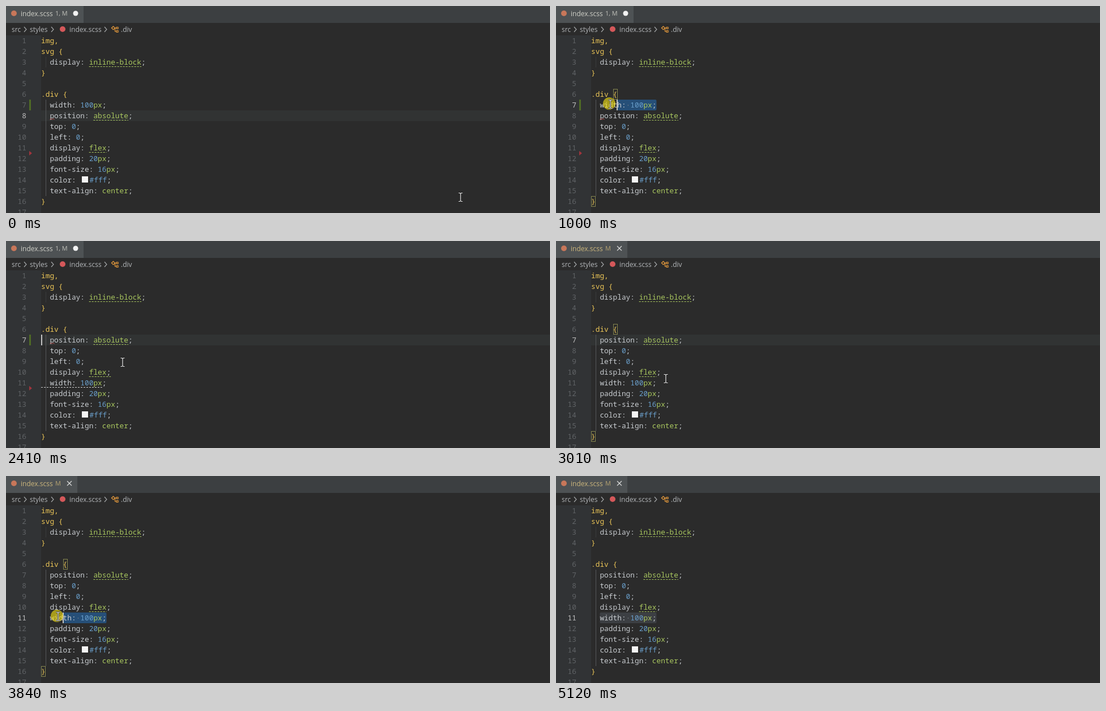
Recreate the animation shown at these times as an HTML page. Size 961x367 px, loop 5.2 s.

```html
<!DOCTYPE html>
<html lang="en">
<head>
<meta charset="utf-8">
<title>Moving a declaration</title>
<style>
  html, body { margin: 0; width: 100%; height: 100%; overflow: hidden; background: #2b2b2b; }
  svg { display: block; }
  text { white-space: pre; }
  .mono { font: 12.83px "Noto Sans Mono", "DejaVu Sans Mono", monospace; }
  .ui { font: 12px "Open Sans", "Noto Sans", sans-serif; fill: #b4b7ba; }
</style>
</head>
<body>
<svg id="stage" width="961" height="367" viewBox="0 0 961 367"></svg>
<script>
const LOOP = 5200, LEFT = 62, CHAR = 7.7, ROW = 19, TOP = 52;
const YELLOW = '#ecc658', GREY = '#c8ccd0', GREEN = '#a9c75f', BLUE = '#6a9fcb';
const stage = document.getElementById('stage');

function add(parent, tag, attrs = {}, content) {
  const el = document.createElementNS('http://www.w3.org/2000/svg', tag);
  for (const name in attrs) el.setAttribute(name, attrs[name]);
  if (content !== undefined) el.textContent = content;
  parent.appendChild(el);
  return el;
}
const rect = (parent, x, y, width, height, fill, more) =>
  add(parent, 'rect', { x, y, width, height, fill, ...more });
const path = (parent, d, stroke, width = 1, more) =>
  add(parent, 'path', { d, stroke, 'stroke-width': width, fill: 'none', ...more });
const label = (parent, x, y, content, more) =>
  add(parent, 'text', { class: 'ui', x, y, ...more }, content);
const show = (el, on) => el.setAttribute('display', on ? 'inline' : 'none');
const colX = col => LEFT + col * CHAR;
const rowY = line => TOP + (line - 1) * ROW;

// Editor backdrop
rect(stage, 0, 0, 961, 367, '#2b2b2b');
rect(stage, 0, TOP, LEFT, 315, '#313335');
const activeRow = rect(stage, LEFT, 0, 899, ROW, '#313333');
const selection = rect(stage, 0, 0, 0, ROW, '#264f78', { rx: 2 });

// Tab bar
rect(stage, 0, 0, 961, 30, '#3c3f41');
const tab = rect(stage, 0, 0, 137, 30, '#4e5254');
add(stage, 'circle', { cx: 14, cy: 13, r: 5, fill: '#c8775a' });
const title = label(stage, 26, 18, 'index.scss');
const badge = label(stage, 87, 17, '1, M', { style: 'font-size:11px' });
const dirtyDot = add(stage, 'circle', { cx: 123, cy: 13, r: 4.5, fill: '#f2f2f2' });
const closeMark = path(stage, 'M-4 -4L4 4M4 -4L-4 4', '#d8d8d8', 1.3);

// Breadcrumbs
label(stage, 10, 46, 'src');
label(stage, 42, 46, 'styles');
label(stage, 112, 46, 'index.scss');
label(stage, 203, 46, '.div');
for (const x of [32, 80, 174]) path(stage, `M${x} 37l4 4.5-4 4.5`, '#a4a7a9', 1.2);
add(stage, 'circle', { cx: 100, cy: 41, r: 5, fill: '#d4585a' });
path(stage, 'M186.500 39l3-3 3 3-3 3zM192 39h3M192.500 39v6h2M195 37.500h3v3h-3zM195 43.500h3v3h-3z', '#e69a3c', 1.2);

// Gutter
const numbers = [];
for (let line = 1; line <= 17; line++) {
  numbers[line] = add(stage, 'text',
    { class: 'mono', x: 36, y: rowY(line) + 14, 'text-anchor': 'end', fill: '#606366' }, line);
}
const gutterMarks = add(stage, 'g');
rect(gutterMarks, 41, rowY(7), 3, ROW, '#4f6b25');
add(gutterMarks, 'path', { d: 'M41 257l5 4-5 4z', fill: '#a0353d' });

path(stage, `M70.500 ${rowY(3)}v${ROW}`, '#393b3c');
path(stage, `M70.500 ${rowY(7)}V${rowY(16)}`, '#555759');

// Code
function dashes(parent, line, from, to, color) {
  return path(parent, `M${colX(from)} ${rowY(line) + 17.5}H${colX(to)}`, color, 1,
    { 'stroke-dasharray': '3 2' });
}
function tokenColor(token, inValue) {
  if (!inValue || /^[:;\s]/.test(token)) return GREY;
  return /^[\d#]/.test(token) ? BLUE : GREEN;
}
function drawRow(parent, source, line) {
  const text = add(parent, 'text', { class: 'mono', x: LEFT, y: rowY(line) + 14, fill: YELLOW });
  if (!source.startsWith('  ')) { text.textContent = source; return; }
  const colon = source.indexOf(':');
  for (const match of source.matchAll(/#\w+|\d+|[a-z-]+|[:;]|\s+/g)) {
    const [token] = match, col = match.index;
    const span = add(text, 'tspan', { fill: tokenColor(token, col > colon) }, token);
    if (token[0] === '#') {
      span.setAttribute('x', 147.5);
      rect(parent, 134, rowY(line) + 3, 11, 11, '#f4f4f4');
    }
    if (/^(inline-block|absolute|flex)$/.test(token)) dashes(parent, line, col, col + token.length, GREEN);
  }
}
function drawCode(declarations) {
  const group = add(stage, 'g');
  const rows = ['img,', 'svg {', '  display: inline-block;', '}', '', '.div {',
    ...declarations.map(d => `  ${d};`), '}'];
  rows.forEach((source, i) => drawRow(group, source, i + 1));
  return group;
}
const head = ['position: absolute', 'top: 0', 'left: 0', 'display: flex'];
const tail = ['padding: 20px', 'font-size: 16px', 'color: #fff', 'text-align: center'];
const codeBefore = drawCode(['width: 100px', ...head, ...tail]);
const codeAfter = drawCode([...head, 'width: 100px', ...tail]);

const staleHints = add(stage, 'g');
dashes(staleHints, 10, 15, 16, GREEN);
dashes(staleHints, 11, 0, 14, '#cfcfcf');
const spaceDot = add(stage, 'circle', { cx: colX(8.5), r: 0.8, fill: '#7b8288' });
const squiggle = path(stage, 'M77.500 1.500l2-2 2 2 2-2 2 2', '#c75450', 1);

const brackets = add(stage, 'g');
for (const [col, line] of [[5, 6], [0, 16]]) {
  rect(brackets, Math.round(colX(col)) + 0.5, rowY(line) + 0.5, 7, ROW - 1, 'none', { stroke: '#85864f' });
}
const caret = rect(stage, 0, 0, 2, ROW, '#c4c4c4');

// Pointer
const pressRing = add(stage, 'circle', { r: 11, fill: '#f5e214', opacity: 0.62 });
const pointer = add(stage, 'g');
const beam = 'M-3.500 -7.500H-1.500L0 -6.500L1.500 -7.500H3.500M0 -6.500V6.500M-3.500 7.500H-1.500L0 6.500L1.500 7.500H3.500';
path(pointer, beam, '#1c1c1c', 2.6);
path(pointer, beam, '#f0f0f0', 1.2);

// Bursts of activity: start, end, number of picture changes
const bursts = [[70, 540, 8], [730, 1200, 8], [1270, 1340, 2], [1540, 1800, 5], [2200, 2680, 8],
  [2740, 3010, 5], [3360, 3840, 7], [3910, 3980, 2], [4370, 4860, 8], [4920, 5120, 3]];

const pointerPath = [[0, 803, 339], [20, 803, 339], [540, 197, 183], [663, 197, 183], [800, 182, 174],
  [998, 96, 174], [1200, 81, 173], [1340, 75, 173], [1475, 75, 173], [1800, 291, 169],
  [2135, 291, 169], [2410, 206, 215], [2680, 197, 243], [3010, 194, 244], [3295, 194, 244],
  [3480, 188, 264], [3580, 182, 252], [3840, 92, 249], [3910, 75, 249], [3980, 79, 242],
  [4300, 79, 242], [4860, 938, 359]];
const firstDrag = [[800, 15], [998, 6], [1200, 2]];
const secondDrag = [[3580, 15], [3840, 5], [3910, 2]];

function snap(t) {
  let snapped = 0;
  for (const [start, end, count] of bursts) {
    if (t < start) break;
    const step = (end - start) / (count - 1);
    snapped = start + Math.min(count - 1, Math.floor((t - start) / step)) * step;
  }
  return snapped;
}
function track(keys, t) {
  const i = keys.findIndex(key => key[0] > t);
  if (i === 0) return keys[0].slice(1);
  if (i < 0) return keys[keys.length - 1].slice(1);
  const a = keys[i - 1], b = keys[i];
  const u = (t - a[0]) / (b[0] - a[0]), eased = u * u * (3 - 2 * u);
  return a.slice(1).map((v, k) => v + (b[k + 1] - v) * eased);
}

function draw(time) {
  const t = snap(time);
  const between = (a, b) => t >= a && t < b;
  const moved = t >= 2260, saved = t >= 2535, clean = t >= 2735;
  const secondPick = t >= 3570;
  const line = t < 790 ? 8 : secondPick ? 11 : 7;

  show(codeBefore, !moved);
  show(codeAfter, moved);
  show(staleHints, between(2260, 2600));
  show(gutterMarks, !saved);
  show(squiggle, !clean);
  squiggle.setAttribute('transform', `translate(0 ${rowY(moved ? 7 : 8) + 15})`);
  numbers.forEach((el, n) => {
    el.setAttribute('fill', n === line ? '#c0c0c0' : '#606366');
    el.setAttribute('font-weight', n === line ? 600 : 400);
  });

  tab.setAttribute('width', clean ? 126 : 137);
  title.style.fill = clean ? '#ccb67c' : '#d0d0c8';
  badge.style.fill = clean ? '#b5a270' : '#c0c1ba';
  badge.textContent = clean ? 'M' : '1, M';
  show(dirtyDot, !saved);
  show(closeMark, saved);
  closeMark.setAttribute('transform', `translate(${clean ? 112 : 123} 13)`);

  show(activeRow, t < 790 || between(2260, 3570));
  activeRow.setAttribute('y', rowY(line));

  const selecting = between(790, 2260) || secondPick;
  const col = Math.round(track(secondPick ? secondDrag : firstDrag, t)[0]);
  show(selection, selecting);
  selection.setAttribute('x', colX(col));
  selection.setAttribute('y', rowY(line));
  selection.setAttribute('width', (15 - col) * CHAR);
  selection.setAttribute('fill', t >= 4915 ? '#3c3f43' : '#264f78');
  show(spaceDot, selecting && col <= 8);
  spaceDot.setAttribute('cy', rowY(line) + 10);

  show(brackets, between(790, 1130) || between(2535, 3905));
  show(caret, between(790, 1600) || between(2260, 2735) || between(3570, 4915));
  caret.setAttribute('x', Math.round(colX(selecting ? col : 0)) - (selecting ? 1 : 0));
  caret.setAttribute('y', rowY(line));

  const [x, y] = track(pointerPath, t).map(Math.round);
  show(pointer, t < 4915);
  pointer.setAttribute('transform', `translate(${x} ${y})`);
  show(pressRing, between(790, 1535) || between(3570, 4365));
  pressRing.setAttribute('cx', x - 2);
  pressRing.setAttribute('cy', y - 1);
}

const began = performance.now();
function tick() {
  draw((performance.now() - began) % LOOP);
  requestAnimationFrame(tick);
}
tick();
</script>
</body>
</html>
```
